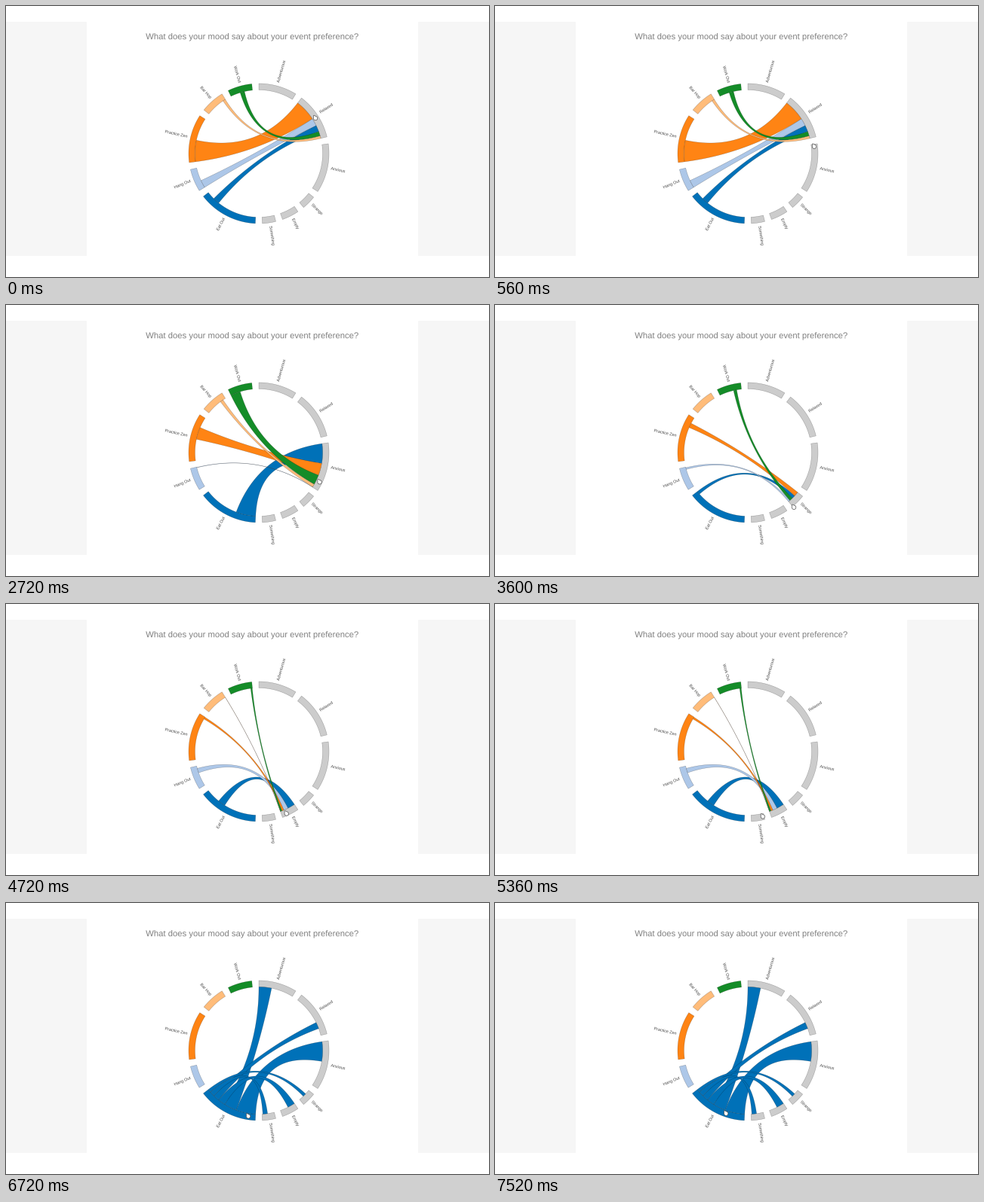
Animation, 640 px wide and 360 px high, one loop 7600 ms. Source, as a matplotlib script:

```python
import numpy as np
import matplotlib.pyplot as plt
from matplotlib.animation import FuncAnimation
from matplotlib.patches import PathPatch, Polygon, Rectangle
from matplotlib.textpath import TextPath
from matplotlib.transforms import Affine2D

W, H, DPI = 640, 360, 100
FRAMES, STEP = 95, 80
PX = 72 / DPI
CX, CY = 335, 196
R_OUT = 93
R_IN = R_OUT / 1.1
R_TEXT = 97.5
PAD = 0.1
GREY = "#cccccc"

MOODS = ["Adventurous", "Relaxed", "Anxious", "Strange", "Empty", "Something"]
EVENTS = {"Eat Out": "#0071b8", "Hang Out": "#adc7e8", "Practice Zen": "#ff8414",
          "Bar Hop": "#ffbc7a", "Work Out": "#148c28"}

# chart data: one row per mood, one column per event
FLOW = np.array([
    [115, 56, 34, 84, 27],
    [59, 69, 194, 24, 40],
    [178, 3, 110, 28, 89],
    [30, 16, 42, 0, 29],
    [67, 41, 18, 1, 14],
    [43, 3, 2, 61, 2],
])

# the pointer travels round the ring: times in ms, angles in degrees
TIMES = [0, 560, 1600, 2720, 3600, 4720, 6400, 7520]
ANGLES = [58, 84, 105, 116, 140, 156, 185, 199]
LAG = 160


def layout(flow):
    """Angles of every group and of both ends of every chord."""
    n, m = flow.shape
    full = np.block([[np.zeros((n, n)), flow], [flow.T, np.zeros((m, m))]])
    k = (2 * np.pi - PAD * (n + m)) / full.sum()
    groups, ends, a = [], {}, 0
    for i, row in enumerate(full):
        start = a
        for j in np.argsort(-row, kind="stable"):
            ends[i, j] = (a, a + row[j] * k)
            a = ends[i, j][1]
        groups.append((start, a))
        a += PAD
    return groups, ends


def polar(r, a):
    return np.column_stack([CX + r * np.sin(a), CY - r * np.cos(a)])


def arc(r, a0, a1):
    return polar(r, np.linspace(a0, a1, 40))


def bend(p, q):
    """Quadratic curve from p to q, pulled to the centre."""
    t = np.linspace(0, 1, 50)[:, None]
    return (1 - t) ** 2 * p + 2 * t * (1 - t) * np.array([CX, CY]) + t ** 2 * q


def ribbon(src, dst):
    s, d = arc(R_IN, *src), arc(R_IN, *dst)
    return np.vstack([s, bend(s[-1], d[0]), d, bend(d[-1], s[0])])


def shape(points, color, z, edge=(0, 0, 0, 0.3), width=0.5):
    return ax.add_patch(Polygon(points, closed=True, fc=color, ec=edge,
                                lw=width * PX, joinstyle="round", zorder=z))


def glyphs(text, size):
    path = TextPath((0, 0), text, size=size, prop={"family": "Liberation Sans"})
    return path, path.get_extents().x1


def put(path, move, color):
    ax.add_patch(PathPatch(move.transform_path(path), fc=color, lw=0, zorder=5))


def label(text, angle, size=5.45):
    path, width = glyphs(text, size)
    deg = np.degrees(angle)
    x, turn = (R_TEXT, deg - 90) if deg < 180 else (-R_TEXT - width, deg + 90)
    move = Affine2D().scale(1, -1).translate(x, 0.05 * size)
    put(path, move.rotate_deg(turn).translate(CX, CY), "#484848")


def pointer_angle(t):
    return np.radians(np.interp(t, TIMES, ANGLES))


def pointer_pos(t):
    swerve = 7 * np.exp(-((t - 3800) / 800) ** 2)
    return polar(88.5 + swerve, np.array([pointer_angle(t)]))


def hand_outline():
    """Round fist with one finger stretched to the upper left."""
    a = np.linspace(0, 2 * np.pi, 40, endpoint=False)
    r = 2.7 + 1.7 * np.exp(-((a - np.radians(237)) / 0.35) ** 2)
    return np.column_stack([r * np.cos(a), r * np.sin(a)])


fig = plt.figure(figsize=(W / DPI, H / DPI), dpi=DPI, facecolor="white")
ax = fig.add_axes([0, 0, 1, 1])
ax.set_xlim(0, W)
ax.set_ylim(H, 0)
ax.axis("off")

for x0, x1 in [(0, 107), (546, W)]:
    ax.add_patch(Rectangle((x0, 21), x1 - x0, 311, fc="#f6f6f6", lw=0))

title, title_w = glyphs("What does your mood say about your event preference?", 11.3)
put(title, Affine2D().scale(1, -1).translate(326 - title_w / 2, 44.2), "#808080")

groups, ends = layout(FLOW)
fills = [GREY] * len(MOODS) + list(EVENTS.values())
for name, (a0, a1), fill in zip([*MOODS, *EVENTS], groups, fills):
    shape(np.vstack([arc(R_OUT, a0, a1), arc(R_IN, a1, a0)]), fill, 2)
    label(name, (a0 + a1) / 2)

chords = {}
for m, e in np.argwhere(FLOW > 0):
    g = e + len(MOODS)
    chords[m, g] = shape(ribbon(ends[m, g], ends[g, m]), fills[g], 3)

HAND = hand_outline()
hand = shape(HAND, "white", 6, "#505050", 0.7)
starts = [a0 for a0, _ in groups]


def draw(i):
    t = i * STEP
    active = np.searchsorted(starts, pointer_angle(t - LAG)) - 1
    for pair, chord in chords.items():
        chord.set_visible(active in pair)
    hand.set_xy(HAND + pointer_pos(t))
    return [*chords.values(), hand]


anim = FuncAnimation(fig, draw, frames=FRAMES, interval=STEP,
                     repeat=True, repeat_delay=0, blit=False)
plt.show()
```
